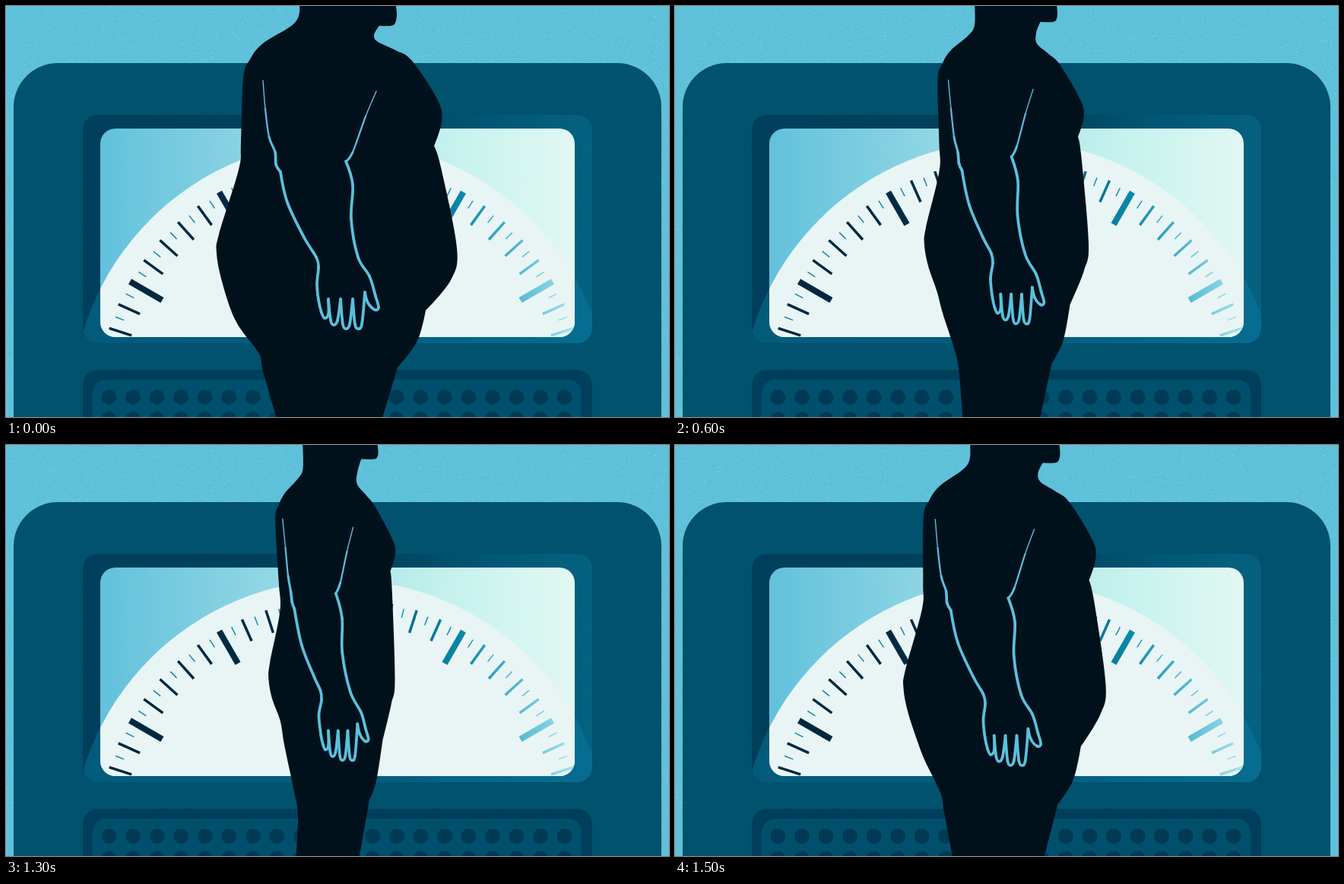
Animation, 872 px wide and 540 px high, one loop 1600 ms. Source, as an HTML page with a canvas:

```html
<!DOCTYPE html>
<html lang="en">
<head>
<meta charset="utf-8">
<title>Figure on a scale</title>
<style>
html, body { margin: 0; width: 100%; height: 100%; overflow: hidden; background: #61c2da; }
canvas { display: block; }
</style>
</head>
<body>
<canvas id="stage" width="872" height="540"></canvas>
<script>
const W = 872, H = 540;
const ctx = document.getElementById('stage').getContext('2d');

// Key points are "x,y"; a trailing "!" marks a sharp corner.
const parse = text => text.split(' ').map(p => {
  const [x, y] = p.split(',').map(parseFloat);
  return { x, y, sharp: p.endsWith('!') };
});

// The two extremes; every pose is a blend of them.
const heavy = {
  back: parse('386,-5 385,13 374,27 338,49 321,70 312,95 309,180 306,215 280,300 277,325 283,358 296,400 309,425 333,457 338,480 357,545!'),
  front: parse('512,-5 514,10 512,22 506,26 491,26! 484,38 489,47 512,58 534,72 568,124 573,152 563,184! 572,212 593,318 585,360 552,400! 541,440 515,475! 494,545!'),
  rear: parse('338,98 341,135 346,172 354,192 355,208 361,218! 370,258 392,304 408,330 411,343 409,365 411,386'),
  fore: parse('487,112 473,145 456,192 447,204! 456,235 454,280 463,330 478,355 486,381')
};
const slim = {
  back: parse('386,-5 387,37 381,51 371,68 366,82 363,100 370,180 373,220 364,282 363,303 367,325 377,350 380,385 389,455 394,490 384,545!'),
  front: parse('475,-5 476,8 475,14 471,16 454,16! 450,33 447,52 455,68 464,84 484,126 486,141 481,160! 481,185 479,305 475,335 471,385! 464,440 460,465! 449,545!'),
  rear: parse('371,97 375,135 378,172 380,192 382,206 384,214! 394,265 408,304 414,320 415,332 411,352 414,380'),
  fore: parse('445,107 439,138 433,177 428,192! 436,225 437,270 448,322 462,350 467,369')
};
const LEAN = [0, 2, 8, 4, 0];   // sideways shift of the body per step
const SWAY = [0, -4, 5, 1, 0];  // sideways shift of the arm per step

function blend(part, w, dx) {
  return heavy[part].map((a, i) => {
    const b = slim[part][i];
    return { x: a.x + (b.x - a.x) * w + dx, y: a.y + (b.y - a.y) * w, sharp: a.sharp };
  });
}

// Little finger, three equal fingers, thumb
function hand(w, dx) {
  const pts = [];
  const add = (x, y, sharp) => pts.push({ x: 419 + (x - 419) * (1 - .27 * w) + dx, y: y - 13 * w, sharp });
  add(415, 403);
  add(419, 410);
  add(424, 405);
  for (let i = 0; i < 3; i++) {
    const x = 424 + 16 * i, tip = i ? 424 : 419;
    add(x, 385, true);
    add(x + 3, tip - 6);
    add(x + 7, tip);
    add(x + 12, tip - 6);
  }
  add(472, 376, true);
  add(476, 390);
  add(485, 399);
  add(490, 396);
  return pts;
}

const poses = LEAN.map((lean, i) => {
  const w = i / 4, sway = SWAY[i];
  return {
    outline: [...blend('back', w, lean), ...blend('front', w, lean).reverse()],
    arm: [...blend('rear', w, sway), ...hand(w, sway), ...blend('fore', w, sway).reverse()]
  };
});

// Smooth curve from point i to point i + 1
function curve(pts, i) {
  const a = pts[i], b = pts[i + 1];
  const before = pts[i - 1] || a, after = pts[i + 2] || b;
  const k = a.sharp ? 0 : 1 / 6, m = b.sharp ? 0 : 1 / 6;
  ctx.bezierCurveTo(a.x + (b.x - before.x) * k, a.y + (b.y - before.y) * k,
    b.x - (after.x - a.x) * m, b.y - (after.y - a.y) * m, b.x, b.y);
}

function box(g, x, y, w, h, r, fill) {
  g.beginPath();
  g.roundRect(x, y, w, h, r);
  g.fillStyle = fill;
  g.fill();
}

function disc(g, x, y, r, fill) {
  g.beginPath();
  g.arc(x, y, r, 0, Math.PI * 2);
  g.fillStyle = fill;
  g.fill();
}

function fade(g, x0, x1, ...stops) {
  const grad = g.createLinearGradient(x0, 0, x1, 0);
  for (const [at, color] of stops) grad.addColorStop((at - x0) / (x1 - x0), color);
  return grad;
}

function grain(g, count, x, y, w, h, color) {
  let seed = 7;
  const rnd = () => (seed = (seed * 16807) % 2147483647) / 2147483647;
  g.fillStyle = color;
  for (let i = 0; i < count; i++) g.fillRect(x + rnd() * w | 0, y + rnd() * h | 0, 1 + rnd() * 2 | 0, 1);
}

function ticks(g) {
  const dark = fade(g, 124, 748, [124, '#00263d'], [350, '#002c45'], [490, '#005b79'],
    [600, '#0a88aa'], [645, '#38a5c4'], [700, '#72c8de'], [748, '#a9e3eb']);
  const light = fade(g, 124, 748, [124, '#1684a6'], [600, '#1b90b0'], [660, '#55b4cf'], [748, '#a9e3eb']);
  for (let deg = 15; deg <= 165; deg += 3) {
    const major = deg % 30 === 0, medium = deg % 6 === 0;
    const inner = major ? 272 : medium ? 290 : 306, outer = medium ? 321 : 318;
    const c = Math.cos(deg * Math.PI / 180), s = Math.sin(deg * Math.PI / 180);
    g.beginPath();
    g.moveTo(441 - c * inner, 522.5 - s * inner);
    g.lineTo(441 - c * outer, 522.5 - s * outer);
    g.lineWidth = major ? 8 : medium ? 3.5 : 1.5;
    g.strokeStyle = medium ? dark : light;
    g.stroke();
  }
}

function drawScale() {
  const layer = document.createElement('canvas');
  layer.width = W;
  layer.height = H;
  const g = layer.getContext('2d');
  const dial = fill => disc(g, 440, 531, 354, fill);

  g.fillStyle = '#5ec0d9';
  g.fillRect(0, 0, W, H);
  grain(g, 16000, 0, 0, W, H, 'rgba(160,224,238,.3)');
  box(g, 10, 75, 852, 540, 58, '#00526e');
  grain(g, 5000, 22, 100, 828, 440, 'rgba(0,100,135,.16)');

  // Recessed frame with the dial showing faintly through it
  box(g, 101, 143, 670, 300, 20, fade(g, 101, 771, [101, '#003f5b'], [500, '#00445f'], [640, '#005876'], [771, '#066180']));
  g.save();
  g.clip();
  dial('rgba(8,125,165,.45)');
  g.restore();

  // Window
  box(g, 124, 161, 624, 274, 20, fade(g, 124, 748, [124, '#62c1dc'], [310, '#89d3e2'],
    [560, '#c1f0ec'], [660, '#d2f5f0'], [748, '#e2f7f3']));
  g.save();
  g.clip();
  dial('#e8f5f4');
  ticks(g);
  g.restore();

  // Speaker grille
  box(g, 101, 478, 670, 90, 20, '#003f5b');
  box(g, 114, 491, 643, 90, 18, '#00506d');
  for (let i = 0; i < 20; i++)
    for (const y of [514, 543]) disc(g, 135.5 + i * 31.53, y, 10, '#003a55');
  return layer;
}

function drawFigure({ outline, arm }) {
  ctx.beginPath();
  ctx.moveTo(outline[0].x, outline[0].y);
  for (let i = 0; i < outline.length - 1; i++) curve(outline, i);
  ctx.fillStyle = '#00111c';
  ctx.fill();

  // The arm line tapers towards both shoulder ends
  ctx.strokeStyle = '#5cc0dc';
  ctx.lineCap = ctx.lineJoin = 'round';
  const last = arm.length - 2;
  for (let i = 0; i <= last; i++) {
    ctx.beginPath();
    ctx.moveTo(arm[i].x, arm[i].y);
    curve(arm, i);
    ctx.lineWidth = Math.min(3.7, 1.4 + .8 * Math.min(i, last - i));
    ctx.stroke();
  }
}

// Hold, four steps to slim, hold, four steps back
function stepAt(t) {
  const step = Math.min(Math.floor(t / 100) - 4, Math.ceil(16 - t / 100));
  return Math.max(0, Math.min(4, step));
}

const scale = drawScale();
function render() {
  ctx.drawImage(scale, 0, 0);
  drawFigure(poses[stepAt(performance.now() % 1600)]);
  requestAnimationFrame(render);
}
render();
</script>
</body>
</html>
```
